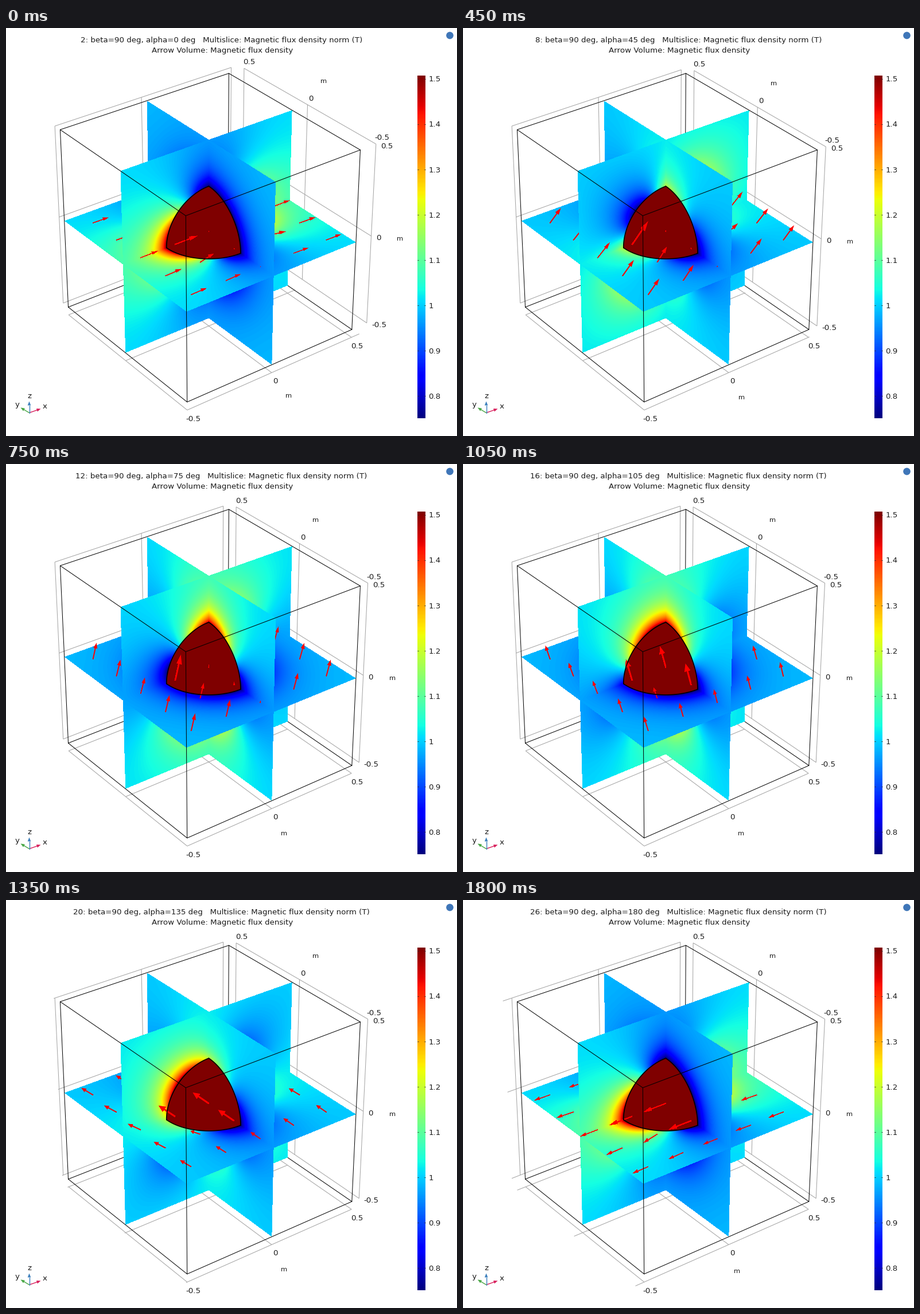
Write a matplotlib script that moves like this. It is 786 by 712 pixels and loops after 1.95 s.

```python
import itertools

import matplotlib.pyplot as plt
import numpy as np
from matplotlib.animation import FuncAnimation
from matplotlib.collections import LineCollection
from matplotlib.patches import Circle, Polygon

W, H = 786, 712
FRAMES, INTERVAL = 13, 150
RADIUS, K = 0.25, 0.25          # sphere radius and dipole strength
NEIGHBOUR = 0.35                # influence of the outer boundary
LOW, HIGH = 0.752, 1.505
ARROW = 0.09                    # arrow length per tesla
GAP = 0.046                     # distance from the box to the axis planes
INK, GREY = "#1c1c1c", "#a2a2a2"
TICKS = (-0.5, 0, 0.5)
JET = plt.get_cmap("jet")

# ---- pinhole camera looking at the middle of the box
CENTRE, FOCUS, DISTANCE = (352.9, 354.6), 363, 9.09


def camera():
    ahead = np.array([3, 4, -3]) / np.sqrt(34)
    right = np.array([4, -3, 0]) / 5
    up = np.cross(right, ahead)
    depth = np.append(ahead / DISTANCE, 1)
    cols = np.append(FOCUS * right, 0) + CENTRE[0] * depth
    rows = np.append(-FOCUS * up, 0) + CENTRE[1] * depth
    return np.array([cols, rows, depth])


CAM = camera()


def project(points):
    q = np.asarray(points, float) @ CAM[:, :3].T + CAM[:, 3]
    return q[..., :2] / q[..., 2:], q[..., 2]


def flat(points):
    return project(points)[0]


# ---- magnetic field of a permeable sphere in a uniform field
def field(points, axis):
    m = np.eye(3)[axis]
    out = np.tile(m, (len(points), 1))
    for cell in itertools.product((-1, 0, 1), repeat=3):
        d = points - np.array(cell)
        r2 = np.maximum((d * d).sum(1), RADIUS ** 2 / 4)
        gain = K * RADIUS ** 3 / r2 ** 1.5 * (NEIGHBOUR if any(cell) else 1)
        out += gain[:, None] * (3 * (d[:, axis] / r2)[:, None] * d - m)
    inside = (points ** 2).sum(1) <= RADIUS ** 2
    out[inside] = m * (1 + 2 * K)
    return out


# ---- nearest slice seen through each pixel
def trace_slices():
    v, u = np.mgrid[0:H, 0:W]
    pix = np.stack([u, v, np.ones_like(u)], -1).astype(float)
    depth = np.full((H, W), np.inf)
    pos = np.zeros((H, W, 3))
    for fixed in range(3):
        free = [i for i in range(3) if i != fixed]
        s = pix @ np.linalg.inv(CAM[:, free + [3]]).T
        ab, w = s[..., :2] / s[..., 2:], 1 / s[..., 2]
        hit = (np.abs(ab) <= 0.5).all(-1) & (w > 0) & (w < depth)
        depth[hit] = w[hit]
        p = np.zeros((hit.sum(), 3))
        p[:, free] = ab[hit]
        pos[hit] = p
    return depth, pos


DEPTH, POS = trace_slices()
SEEN = np.isfinite(DEPTH)
PTS = POS[SEEN]
CORE = (PTS ** 2).sum(1) <= RADIUS ** 2
FIELD_X, FIELD_Z = field(PTS, 0), field(PTS, 2)

GRID = (-0.4, -0.2, 0, 0.2, 0.4)
BASES = np.array([(x, y, 0) for x in GRID for y in GRID], float)
ARROW_X, ARROW_Z = field(BASES, 0), field(BASES, 2)


def stamp_arrow(img, base, vec):
    size = np.linalg.norm(vec)
    (a, b), (wa, wb) = project([base, base + ARROW * vec])
    length = np.hypot(*(b - a))
    d = (b - a) / length
    shaft, wide, head = 1.0 * size, 3.7 * size, 0.36 * length
    x0, y0 = np.floor(np.minimum(a, b) - 7).astype(int)
    x1, y1 = np.ceil(np.maximum(a, b) + 8).astype(int)
    v, u = np.mgrid[y0:y1, x0:x1]
    t = (u - a[0]) * d[0] + (v - a[1]) * d[1]
    s = (v - a[1]) * d[0] - (u - a[0]) * d[1]
    half = np.where(t < length - head, shaft, wide * (length - t) / head)
    cover = np.clip(half - np.abs(s) + 0.5, 0, 1) * (t >= -0.5) * (t <= length)
    # the round body stands out of its axis towards the viewer
    bulge = np.sqrt(np.maximum(half ** 2 - s ** 2, 0)) / FOCUS / DISTANCE
    w = wa + (wb - wa) * t / length - bulge - 1e-4
    cover = (cover * (w < DEPTH[y0:y1, x0:x1]))[..., None]
    part = img[y0:y1, x0:x1]
    part[..., :3] = part[..., :3] * (1 - cover) + np.array([1, 0, 0]) * cover
    part[..., 3:] = np.maximum(part[..., 3:], cover)


def slices(alpha):
    c, s = np.cos(alpha), np.sin(alpha)
    norm = np.linalg.norm(c * FIELD_X + s * FIELD_Z, axis=1)
    norm[CORE] = HIGH
    img = np.ones((H, W, 4))
    img[..., 3] = 0
    img[SEEN] = JET(np.clip((norm - LOW) / (HIGH - LOW), 0, 1))
    for base, vec in zip(BASES, c * ARROW_X + s * ARROW_Z):
        stamp_arrow(img, base, vec)
    return img


# ---- axis planes; the x range grows with the arrows near the box sides
def x_range(alpha):
    reach = 0.15 * np.cos(alpha)
    return -0.5 - max(0, -reach - 0.1), 0.5 + max(0, reach - 0.1)


def axis_lines(lo, hi):
    back, right, floor = 0.5 + GAP, hi + GAP, -0.5 - GAP
    ends = [[(x, back, -.5), (x, back, .5)] for x in (-.5, 0, hi)]
    for t in TICKS:
        ends += [
            [(lo, back, t), (hi, back, t)],
            [(right, -.5, t), (right, .5, t)],
            [(right, t, -.5), (right, t, .5)],
            [(lo, t, floor), (hi, t, floor)],
            [(t, -.5, floor), (t, .5, floor)],
        ]
    return flat(ends)


def label_spots(lo, hi):
    right, floor = hi + GAP, -0.5 - GAP
    spots = []
    for t in TICKS:
        dx = 4.5 + 1.6 * len(f"{t:g}")
        spots += [
            flat((t, -.5, floor)) + (dx, 14),
            flat((right, t, .5)) + (dx, -12),
            flat((right, -.5, t)) + (8.6, 2.2),
        ]
    spots += [
        flat(((lo + hi) / 2, -.5, floor)) + (22, 43.5),
        flat((right, 0, .5)) + (28, -41),
        flat((right, -.5, 0)) + (50.5, 4.7),
    ]
    return spots


# ---- figure
plt.rcParams["font.family"] = "DejaVu Sans"
fig = plt.figure(figsize=(W / 100, H / 100), dpi=100, facecolor="white")
ax = fig.add_axes([0, 0, 1, 1])
ax.axis("off")
PX = 0.72  # points per pixel
CAP, LOWER = 4.9, 3.1  # from the middle of a capital or an m to its baseline


def text(x, y, s, size=13.45, ha="center"):
    return ax.text(x, y + CAP, s, fontsize=size * PX, color=INK,
                   ha=ha, va="baseline", zorder=6)


def line(points, color="black", width=1.0, z=4):
    ax.plot(*np.asarray(points).T, color=color, lw=width * PX, zorder=z,
            solid_capstyle="round", solid_joinstyle="round")


def draw_box():
    hidden = (.5, .5, -.5)
    corners = list(itertools.product((-.5, .5), repeat=3))
    for a, b in itertools.combinations(corners, 2):
        if sum(p != q for p, q in zip(a, b)) == 1:
            line(flat([a, b]), z=1.5 if hidden in (a, b) else 4)


def draw_sphere_rim():
    t = np.linspace(0, np.pi / 2, 60)
    c, s, o = RADIUS * np.cos(t), RADIUS * np.sin(t), 0 * t
    for arc in ((-c, o, s), (o, -c, s), (-c, -s, o)):
        line(flat(np.stack(arc, -1)), width=1.7, z=3)


def draw_colorbar():
    left, right, top, bottom = 716.5, 730.5, 82.5, 680.5
    ax.imshow(np.linspace(1, 0, 598)[:, None], cmap=JET, aspect="auto",
              extent=(left, right, bottom, top), zorder=3)
    for i in range(8):
        y = 88 + 79.1 * i
        line([(left, y), (left + 2, y)], "#303030", 0.8, 5)
        line([(right - 2, y), (right, y)], "#303030", 0.8, 5)
        text(736, y, f"{1.5 - i / 10:.2g}", ha="left")


def draw_triad():
    o = np.array([40, 671])
    for name, tip, spot, color in (
            ("x", (60, 664), (67, 659), "#d81e5b"),
            ("y", (25, 662), (19, 656), "#4aa846"),
            ("z", (40, 651), (40, 641), "#3b7fbd")):
        d = np.array(tip) - o
        d = d / np.hypot(*d)
        n = np.array([-d[1], d[0]])
        neck = tip - 7 * d
        line([o, neck], color, 1.4)
        ax.add_patch(Polygon([tip, neck + 2.8 * n, neck - 2.8 * n],
                             color=color, lw=0, zorder=5))
        text(*spot, name)


draw_box()
draw_sphere_rim()
draw_colorbar()
draw_triad()
ax.add_patch(Circle((773, 12.5), 6.3, color="#3f76b8", lw=0, zorder=5))
text(377, 38, "Arrow Volume: Magnetic flux density")
title = text(375, 19.5, "", 13.4)

frame_lines = LineCollection([], colors=GREY, linewidths=PX, zorder=1)
ax.add_collection(frame_lines)
view = ax.imshow(np.ones((H, W, 4)), interpolation="nearest", aspect="auto",
                 zorder=2)
labels = [text(0, 0, f"{t:g}".replace("\u2212", "-"), ha=ha)
          for t in TICKS for ha in ("center", "center", "left")]
labels += [text(0, 0, "m", 11.5) for _ in range(3)]
ax.set_xlim(-0.5, W - 0.5)
ax.set_ylim(H - 0.5, -0.5)


def update(i):
    degrees = 15 * i
    alpha = np.radians(degrees)
    view.set_data(slices(alpha))
    lo, hi = x_range(alpha)
    frame_lines.set_segments(axis_lines(lo, hi))
    for label, (x, y) in zip(labels, label_spots(lo, hi)):
        drop = LOWER if label.get_text() == "m" else CAP
        label.set_position((x, y + drop))
    title.set_text(f"{2 * i + 2}: beta=90 deg, alpha={degrees} deg   "
                   "Multislice: Magnetic flux density norm (T)")
    return view, frame_lines, title, *labels


anim = FuncAnimation(fig, update, frames=FRAMES, interval=INTERVAL,
                     repeat=True, repeat_delay=0, blit=False)
plt.show()
```
